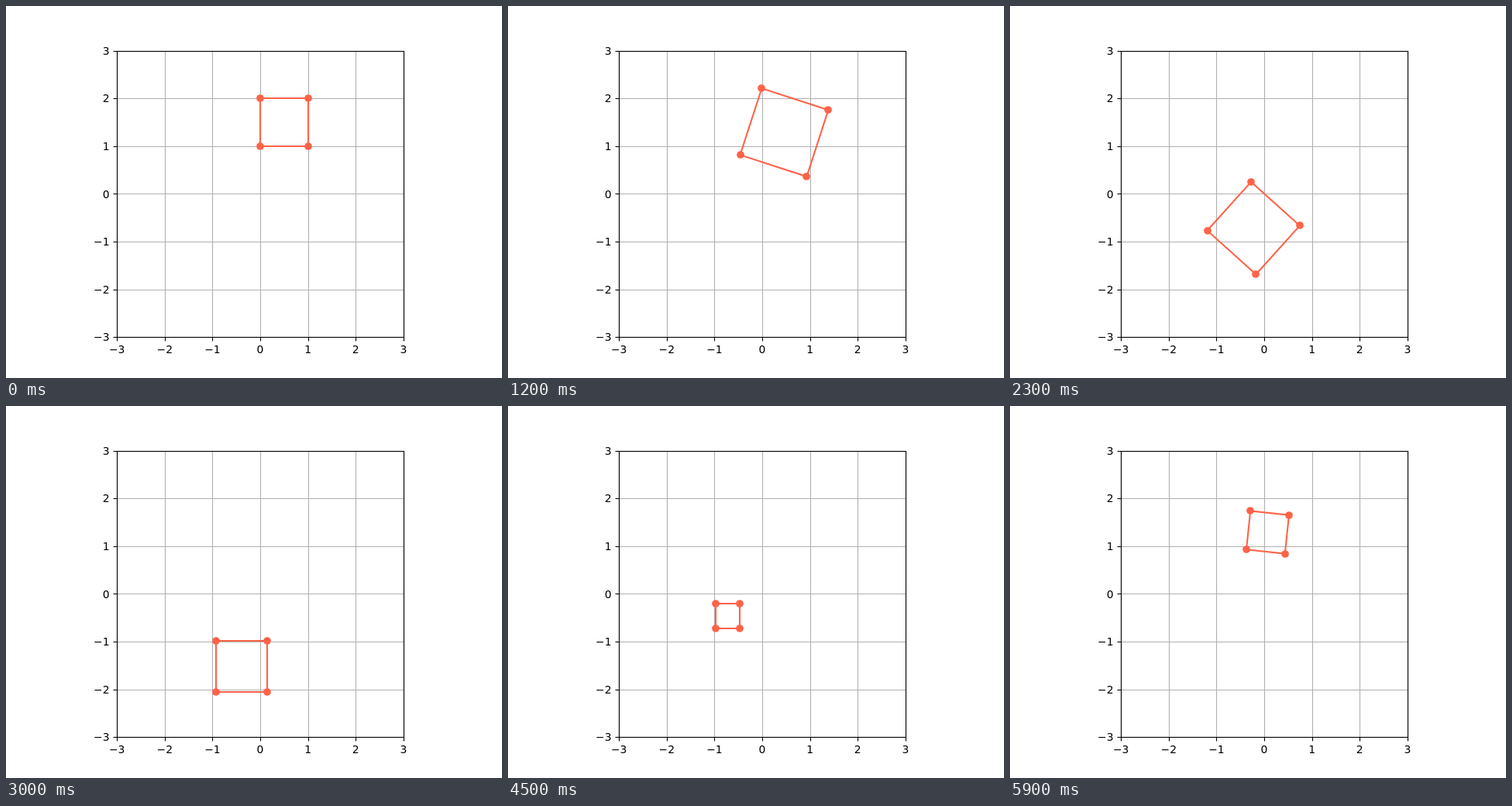
An HTML page with a canvas for the animation above (6000 ms loop, 640 by 480 pixels).

```html
<!DOCTYPE html>
<html lang="en">
<head>
<meta charset="utf-8">
<title>Turning square</title>
<style>
  html, body { margin: 0; width: 100%; height: 100%; overflow: hidden; background: #fff; }
  canvas { display: block; }
</style>
</head>
<body>
<canvas id="stage" width="640" height="480"></canvas>
<script>
const ctx = document.getElementById('stage').getContext('2d');
const STEP_MS = 100, STEPS = 60;
const UNIT = 61.6, CENTER_X = 328, CENTER_Y = 242.4, RANGE = 3;
const THIN = 1.11, ACCENT = '#ff6347';

const toX = x => CENTER_X + x * UNIT;
const toY = y => CENTER_Y - y * UNIT;
const crisp = v => Math.round(v) + 0.5;

const LEFT = crisp(toX(-RANGE)), RIGHT = crisp(toX(RANGE));
const TOP = crisp(toY(RANGE)), BOTTOM = crisp(toY(-RANGE));

function line(x1, y1, x2, y2, color) {
  ctx.strokeStyle = color;
  ctx.lineWidth = THIN;
  ctx.beginPath();
  ctx.moveTo(x1, y1);
  ctx.lineTo(x2, y2);
  ctx.stroke();
}

function eachTick(draw) {
  for (let n = -RANGE; n <= RANGE; n++) draw(n, toX(n), toY(n));
}

function drawGrid() {
  eachTick((n, x, y) => {
    line(crisp(x), TOP, crisp(x), BOTTOM, '#b0b0b0');
    line(LEFT, crisp(y), RIGHT, crisp(y), '#b0b0b0');
  });
}

function drawAxes() {
  ctx.font = '13.889px "DejaVu Sans", sans-serif';
  ctx.textBaseline = 'alphabetic';
  ctx.fillStyle = '#000';
  eachTick((n, x, y) => {
    const label = String(n).replace('-', '\u2212');
    line(crisp(x), BOTTOM, crisp(x), BOTTOM + 5, '#000');
    line(LEFT, crisp(y), LEFT - 5, crisp(y), '#000');
    ctx.textAlign = 'center';
    ctx.fillText(label, x, 448);
    ctx.textAlign = 'right';
    ctx.fillText(label, 133.5, Math.round(y + 5.28));
  });
  ctx.strokeStyle = '#000';
  ctx.lineWidth = THIN;
  ctx.strokeRect(LEFT, TOP, RIGHT - LEFT, BOTTOM - TOP);
}

// The unit square turns about its corner and pulses while that corner circles the origin.
function corners(step) {
  const t = step / 10;
  const turn = step / STEPS * 2 * Math.PI;
  const size = 1 + 0.5 * Math.sin(t);
  const c = size * Math.cos(turn), s = size * Math.sin(turn);
  return [[0, 0], [1, 0], [1, 1], [0, 1]].map(([x, y]) => [
    toX(c * x - s * y + Math.sin(t)),
    toY(s * x + c * y + Math.cos(t))
  ]);
}

function drawSquare(step) {
  const points = corners(step);
  const upright = step % 15 === 0;
  const snapped = points.map(p => p.map(Math.round));

  ctx.strokeStyle = ctx.fillStyle = ACCENT;
  ctx.lineWidth = 2.083;
  ctx.beginPath();
  for (const [x, y] of upright ? snapped : points) ctx.lineTo(x, y);
  ctx.closePath();
  ctx.stroke();

  for (const [x, y] of snapped) {
    ctx.beginPath();
    ctx.arc(x, y, 4.86, 0, 2 * Math.PI);
    ctx.fill();
  }
}

function render(now) {
  const step = Math.floor(now / STEP_MS + 0.001) % STEPS;
  ctx.fillStyle = '#fff';
  ctx.fillRect(0, 0, 640, 480);
  drawGrid();
  drawSquare(step);
  drawAxes();
  requestAnimationFrame(render);
}

render(performance.now());
</script>
</body>
</html>
```
